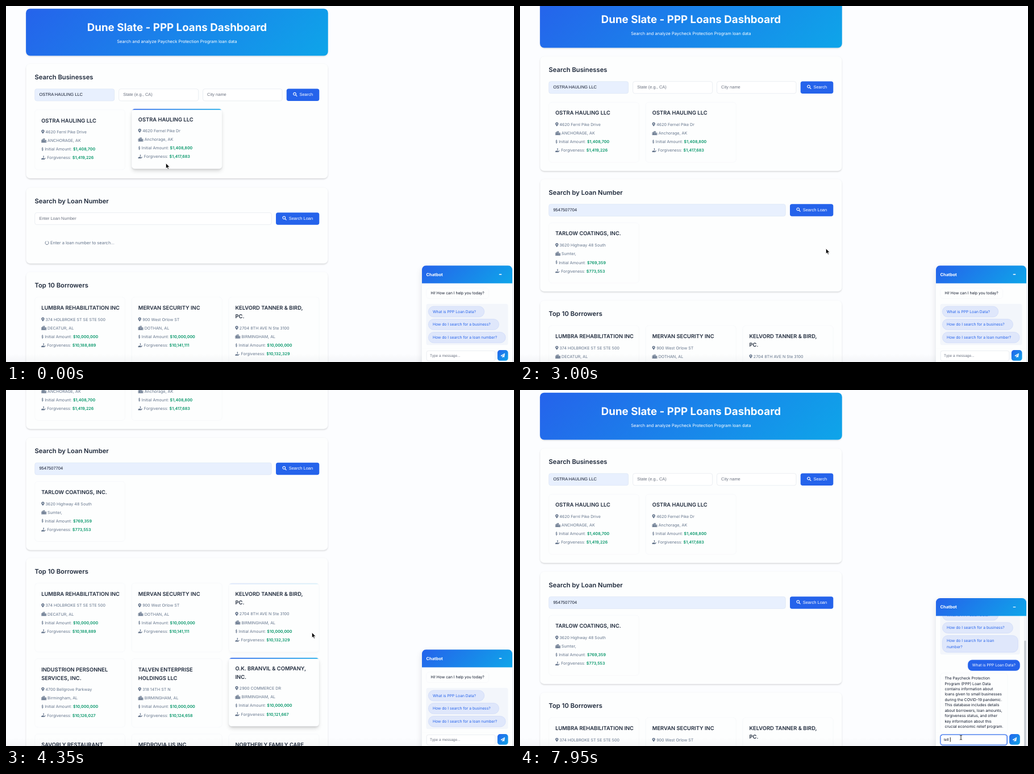
Write an HTML page that moves like this. It is 894 px wide and 626 px high and loops after 8 s.

```html
<!DOCTYPE html>
<html lang="en">
<head>
<meta charset="utf-8">
<title>Loans Dashboard</title>
<style>
html, body { margin: 0; width: 100%; height: 100%; overflow: hidden; }
body { background: #fcfdff; }
* { box-sizing: border-box; }
#stage { position: relative; width: 894px; height: 626px; overflow: hidden; background: #fcfdff; }
#view { position: absolute; left: 0; top: 0; width: 1911px; height: 1338px; transform: scale(.468); transform-origin: 0 0;
  font: 16px/1.6 Inter, sans-serif; color: #1e293b; text-rendering: geometricPrecision; white-space: nowrap; }
#page { position: absolute; inset: 0; }
svg { height: 1em; vertical-align: -.125em; overflow: visible; }
header { position: absolute; left: 74.8px; top: 9.6px; width: 1136.4px; height: 177px; border-radius: 16px; color: #fff; text-align: center;
  background: linear-gradient(135deg, #2563eb, #0ea5e9); box-shadow: 0 4px 6px -1px rgba(0,0,0,.1), 0 2px 4px -1px rgba(0,0,0,.06); }
h1 { position: absolute; margin: 0; width: 100%; top: 39px; font: 700 40px/64px Inter, sans-serif; }
header p { position: absolute; margin: 0; width: 100%; top: 111px; }
section { position: absolute; left: 74.8px; width: 1136.4px; background: #fdfefe; border: 1px solid #f1f5f9; border-radius: 16px;
  box-shadow: 0 4px 6px -1px rgba(0,0,0,.13), 0 2px 4px -1px rgba(0,0,0,.07); }
h2 { position: absolute; left: 32px; top: 32px; margin: 0; font: 600 24px/38.4px Inter, sans-serif; }
.row { position: absolute; left: 32px; right: 32px; top: 94px; height: 46px; display: flex; gap: 16px; }
.field, .btn { font: 16px/44px Arial, "Liberation Sans", sans-serif; border-radius: 8px; }
.field { flex: 1; padding: 0 16px; border: 1px solid #d3dae4; background: #fff; color: #6b7280; }
.filled { background: #e8f0fe; border-color: #cfdcf0; color: #0f172a; }
.focus { border-color: #2563eb; box-shadow: inset 0 0 0 1px #2563eb, 0 0 0 1px #2563eb, 0 0 0 3px rgba(37,99,235,.1); }
.btn { padding: 1px 24px; background: #2563eb; color: #fff; }
.btn svg { margin-right: 8px; }
.card { position: absolute; width: 340.7px; padding: 24px; border: 1px solid #f0f3f7; border-radius: 12px; overflow: hidden; background: #fdfefe; }
.card i { position: absolute; left: 0; top: 0; width: 100%; height: 4px; background: linear-gradient(90deg, #2563eb, #0ea5e9); opacity: 0; }
h3 { margin: 0 0 16px; font: 600 20px/32px Inter, sans-serif; }
.card p { margin: 0 0 8px; font-size: 15.2px; line-height: 24.3px; color: #64748b; }
.card b { font-weight: 600; color: #059669; }
#hint { position: absolute; left: 70.5px; top: 196px; color: #64748b; }
#fade { position: absolute; left: 0; right: 0; bottom: 0; height: 32px; background: linear-gradient(transparent, rgba(15,23,42,.035)); }
#chat { position: absolute; left: 1564px; width: 340px; height: 700px; border-radius: 16px; overflow: hidden; background: #fdfefe; }
#glow { position: absolute; left: 1564px; width: 340px; height: 700px; border-radius: 16px; box-shadow: 0 10px 25px rgba(15,23,42,.12); }
#bar { position: absolute; z-index: 2; left: 0; top: 0; width: 340px; height: 67px; padding: 0 16px; color: #fff; font-weight: 700; line-height: 66px;
  background: linear-gradient(135deg, #2563eb, #0ea5e9); }
#bar i { position: absolute; left: 290px; top: 32px; width: 10px; height: 2.5px; border-radius: 1px; background: #fff; }
#log { position: absolute; left: 16px; top: 84px; width: 308px; font-size: 14.4px; }
.msg { width: fit-content; padding: 0 16px; line-height: 39px; border: 1px solid #f0f3f7; border-radius: 12px; color: #0f172a; background: #fdfefe; }
.me { margin: 20px 0 0 auto; border-color: #2563eb; background: #2563eb; color: #fff; border-radius: 16px; }
#reply { margin-top: 8px; padding: 10px 16px; line-height: 20.15px; }
#opts { margin-top: 19px; padding: 8.5px 7.5px 1px; border-radius: 8px; background: #f3f6fb; }
.opt { width: fit-content; margin-bottom: 7.5px; padding: 8px 31px 8px 16px; line-height: 23px; border: 1px solid #bfcdf5; border-radius: 20px; background: #dfe7fb; color: #2563eb; }
#entry { position: absolute; left: 1564px; top: 1287px; width: 340px; height: 60px; background: #fdfefe; }
#entry .field { position: absolute; left: 17px; top: 8px; width: 259px; height: 39px; padding: 0 12px; font-size: 14px; line-height: 37px; }
#entry .field.focus { color: #0f172a; }
#send { position: absolute; left: 284px; top: 6px; width: 40px; height: 40px; border-radius: 10px; color: #fff; text-align: center; line-height: 40px;
  background: linear-gradient(135deg, #2563eb, #0ea5e9); }
#caret { display: inline-block; width: 2px; height: 17px; margin-left: 1px; vertical-align: -3px; background: #111; }
#track { position: absolute; left: 1895px; top: 849px; width: 9px; height: 500px; background: #f4f6f9; }
#track i { position: absolute; left: 1px; top: 92px; width: 7px; height: 420px; border-radius: 4px; background: #c3c8cf; }
#mouse { position: absolute; left: 0; top: 0; width: 10px; height: 12px; }
</style>
</head>
<body>
<div id="stage">
  <div id="view">
    <div id="page"></div>
    <div id="fade"></div>
    <div id="glow"></div>
    <div id="chat">
      <div id="bar">Chatbot<i></i></div>
      <div id="log">
        <div class="msg">Hi! How can I help you today?</div>
        <div id="opts">
          <div class="opt" id="ask">What is PPP Loan Data?</div>
          <div class="opt">How do I search for a business?</div>
          <div class="opt" id="wrap"></div>
        </div>
        <div class="msg me" id="mine">What is PPP Loan Data?</div>
        <div class="msg" id="reply">The Paycheck Protection<br>Program (PPP) Loan Data<br>contains information about<br>loans given to small businesses<br>during the COVID-19 pandemic.<br>This database includes details<br>about borrowers, loan amounts,<br>forgiveness status, and other<br>key information about this<br>crucial economic relief program.</div>
      </div>
    </div>
    <div id="entry"><div class="field" id="type"></div><div id="send"></div></div>
    <div id="track"><i></i></div>
  </div>
  <svg id="mouse" viewBox="0 0 10 12"><path id="shape"/></svg>
</div>
<script>
const $ = id => document.getElementById(id);
const icon = (w, d, stroke) => `<svg viewBox="0 0 ${w} 512" style="width:${w / 512}em"><path d="${d}" ` +
  (stroke ? `fill="none" stroke="currentColor" stroke-width="${stroke}" stroke-linecap="round"` : 'fill="currentColor" fill-rule="evenodd"') + '/></svg>';

const pin = icon(384, 'M192 512C40 300 0 270 0 192a192 192 0 0 1 384 0c0 78-40 108-192 320zM192 264a72 72 0 1 0 0-144 72 72 0 0 0 0 144z');
const city = icon(640, 'M0 512V160h130V32h50v128h50V0h210v192h200v320zM60 230h70v60H60zM60 350h70v60H60zM290 70h90v60h-90zM290 200h90v60h-90zM290 330h90v60h-90zM500 260h80v60h-80zM500 380h80v60h-80z');
const dollar = icon(288, 'M240 150C225 100 60 95 60 180C60 270 235 235 235 330C235 420 55 415 45 350M144 30V482', 56);
const hand = icon(576, 'M0 352h80l60-48h180c40 0 40 60 0 60h-80v20h130l110-85c40-28 75 20 45 50L390 500H0zM255 10h60v30l30 25-25 30-60-10 85 50v60l-30 25v30h-60v-30l-40-30 25-30 55 15-75-55v-60l35-20z');
const lens = icon(512, 'M208 50a158 158 0 1 0 .1 0zM325 325L475 475', 76);
const ring = icon(512, 'M160 66a210 210 0 1 0 192 0', 64);
const plane = icon(512, 'M476 3L12 271c-18 10-16 36 3 44l106 45L408 107c5-5 13 2 8 8L175 407v81c0 23 28 32 42 15l63-77 125 53c14 6 31-3 33-19l72-432c3-20-18-35-36-24z');

const card = (id, col, top, [name, street, town, amount, back], tall) =>
  `<div class="card" id="${id}" style="left:${32 + col * 364.7}px;top:${top}px;height:${tall ? 259.3 : 227.2}px"><i></i><h3>${name}</h3>` +
  `<p>${pin} ${street}</p><p>${city} ${town}</p><p>${dollar} Initial Amount: <b>$${amount}</b></p><p>${hand} Forgiveness: <b>$${back}</b></p></div>`;
const section = (id, top, height, title, body) =>
  `<section id="${id}" style="top:${top}px;height:${height}px"><h2>${title}</h2>${body}</section>`;

const firm = 'OSTRA HAULING LLC', full = '10,000,000';
const found = [
  [firm, '4620 Fernl Pike Drive', 'ANCHORAGE, AK', '1,408,700', '1,419,226'],
  [firm, '4620 Fernel Pike Dr', 'Anchorage, AK', '1,408,800', '1,417,683']
];
const hit = ['TARLOW COATINGS, INC.', '3620 Highway 48 South', 'Sumter,', '769,359', '773,553'];
const top10 = [
  ['LUMBRA REHABILITATION INC', '374 HOLBROKE ST SE STE 500', 'DECATUR, AL', full, '10,188,889'],
  ['MERVAN SECURITY INC', '900 West Orlow ST', 'DOTHAN, AL', full, '10,141,111'],
  ['KELVORD TANNER &amp; BIRD,<br>PC.', '2704 8TH AVE N Ste 3100', 'BIRMINGHAM, AL', full, '10,132,329'],
  ['INDUSTRION PERSONNEL<br>SERVICES, INC.', '4700 Bellgrove Parkway', 'Birmingham, AL', full, '10,126,027'],
  ['TALVEN ENTERPRISE<br>HOLDINGS LLC', '318 14TH ST N', 'BIRMINGHAM, AL', full, '10,124,658'],
  ['O.K. BRANVIL &amp; COMPANY,<br>INC.', '2900 COMMERCE DR', 'BIRMINGHAM, AL', full, '10,121,667'],
  ['SAVORLY RESTAURANT<br>GROUPINGS LLC', '520 Larkmoor Road', 'BIRMINGHAM, AL', full, '10,118,904'],
  ['MEDROVIA US INC', '1480 Tolland Way', 'BIRMINGHAM, AL', full, '10,115,342'],
  ['NORTHERLY FAMILY CARE,<br>INC.', '3150 Ashmere Drive', 'BIRMINGHAM, AL', full, '10,112,055']
];

$('page').innerHTML =
  '<header><h1>Dune Slate - PPP Loans Dashboard</h1><p>Search and analyze Paycheck Protection Program loan data</p></header>' +
  section('biz', 218, 432, 'Search Businesses',
    `<div class="row"><div class="field filled">${firm}</div><div class="field">State (e.g., CA)</div><div class="field">City name</div><div class="btn">${lens}Search</div></div>` +
    found.map((f, i) => card('found' + i, i, 171.6, f)).join('')) +
  section('loan', 681, 287, 'Search by Loan Number',
    `<div class="row"><div class="field" id="num"></div><div class="btn" id="go">${lens}Search Loan</div></div><div id="hint">${ring} Enter a loan number to search...</div>` +
    card('hit', 0, 164, hit)) +
  section('best', 998, 1250, 'Top 10 Borrowers',
    top10.map((b, i) => card('best' + i, i % 3, 94.4 + Math.floor(i / 3) * 283.3, b, true)).join(''));
$('send').innerHTML = plane;

// linear value along [time, value] steps
const at = (t, steps) => {
  let [t0, v0] = steps[0];
  for (const [t1, v1] of steps) {
    if (t < t1) return v0 + (v1 - v0) * Math.max(0, t - t0) / (t1 - t0 || 1);
    [t0, v0] = [t1, v1];
  }
  return v0;
};
const within = (t, a, b) => t >= a && t < b;
const show = (id, on) => $(id).style.display = on ? '' : 'none';

const scroll = [[2850, 0], [3000, 14], [3150, 46], [3300, 93.5], [3600, 235], [3900, 325], [4050, 330], [4200, 300], [4350, 235.5], [4500, 140], [4650, 55], [4800, 10], [4950, -1.2], [5100, -.6], [5250, 0]];
const mouseX = [[0, 281], [300, 281], [1050, 240], [1350, 200], [1650, 200], [2100, 508], [2550, 508], [3000, 538], [4500, 538], [5100, 712], [5250, 730], [5400, 745], [5850, 798], [6450, 798], [6600, 790], [7050, 780], [7350, 776]];
const mouseY = [[0, 276], [300, 278], [1050, 335], [1350, 374], [1650, 374], [2100, 371], [2550, 371], [3000, 426], [4500, 426], [5100, 612], [5250, 634], [5400, 618], [5850, 538], [6450, 538], [6600, 640], [7050, 640], [7350, 611]];
const lifts = {
  biz: [[600, 1], [900, 0]],
  loan: [[900, 0], [1200, 1], [3300, 1], [3600, 0]],
  best: [[3450, 0], [3750, 1], [4650, 1], [4950, 0]]
};
const hovers = {
  found1: [[300, 1], [600, 0]],
  best5: [[3750, 0], [4050, 1], [4350, 1], [4650, 0]],
  best2: [[4200, 0], [4350, .15], [4500, .5], [4650, 0]]
};
const pointers = {
  arrow: ['M.4.4V9.8L2.5 7.8 4 11.1 5.5 10.4 4 7.2H6.9Z', '#000', '#fff', .7],
  hand: ['M2.2 6V1.4a.9.9 0 0 1 1.8 0V4.6L7.4 5.2Q8.6 5.5 8.4 7L7.7 10.6H3.4L.7 7.2Q.8 6 2.2 6.8Z', '#fff', '#000', .9],
  beam: ['M-2-3.8Q0-3.8 0-2.6Q0-3.8 2-3.8M0-2.6V2.8M-2 4Q0 4 0 2.8Q0 4 2 4', 'none', '#111', .9]
};

function draw(t) {
  $('page').style.transform = `translateY(${-at(t, scroll) / .468}px)`;
  for (const id in lifts) $(id).style.transform = `translateY(${-2 * at(t, lifts[id])}px)`;
  for (const id in hovers) {
    const h = at(t, hovers[id]), el = $(id);
    el.style.transform = `translateY(${-4 * Math.max(0, h - .15) / .85}px)`;
    el.style.boxShadow = `0 10px 15px -3px rgba(0,0,0,${.16 * h}), 0 4px 6px -2px rgba(0,0,0,${.12 * h})`;
    el.firstChild.style.opacity = h;
  }

  const done = t >= 2550, typed = t >= 1650;
  $('num').textContent = typed ? '9547507704' : 'Enter Loan Number';
  $('num').className = 'field' + (typed ? ' filled' : '') + (within(t, 1350, 2550) ? ' focus' : '');
  $('go').style.background = within(t, 2100, 2850) ? '#1d4ed8' : '#2563eb';
  show('hint', !done);
  show('hit', done);
  $('loan').style.height = (done ? 424 : 287) + 'px';
  $('best').style.top = (done ? 1135 : 998) + 'px';

  const sent = t >= 6450, answered = t >= 7050, focus = t >= 7350;
  $('chat').style.top = $('glow').style.top = (answered ? 782 : sent ? 925.6 : 975.4) + 'px';
  $('log').style.transform = `translateY(${answered ? -110 : 0}px)`;
  $('log').style.width = (answered ? 300 : 308) + 'px';
  $('wrap').innerHTML = 'How do I search for a loan' + (answered ? '<br>' : ' ') + 'number?';
  $('wrap').style.width = answered ? '100%' : '';
  $('ask').style.background = within(t, 5850, 6450) ? '#c9d7fa' : '';
  show('mine', sent);
  show('reply', answered);
  show('track', answered);
  $('type').style.width = (answered ? 251 : 259) + 'px';
  $('send').style.left = (answered ? 276 : 284) + 'px';
  $('type').className = 'field' + (focus ? ' focus' : '');
  const count = Math.floor(at(t, [[7350, 0], [7500, 1], [7650, 2], [7800, 4], [7950, 5]]));
  $('type').innerHTML = focus ? 'tell '.slice(0, count).replace(' ', '&nbsp;') + '<span id="caret"></span>' : 'Type a message...';

  const kind = within(t, 1350, 1800) || t >= 7350 ? 'beam' : within(t, 2100, 2700) || within(t, 5850, 6600) ? 'hand' : 'arrow';
  const [d, fill, stroke, width] = pointers[kind];
  const attrs = { d, fill, stroke, 'stroke-width': width, 'stroke-linejoin': 'round' };
  for (const k in attrs) $('shape').setAttribute(k, attrs[k]);
  $('mouse').style.transform = `translate(${at(t, mouseX)}px,${at(t, mouseY)}px)`;
}

// the picture advances every 150 ms
const loop = 8000, tick = 150;
let last = -1;
function frame() {
  const t = Math.floor(performance.now() % loop / tick) * tick;
  if (t !== last) draw(last = t);
  requestAnimationFrame(frame);
}
frame();
</script>
</body>
</html>
```
